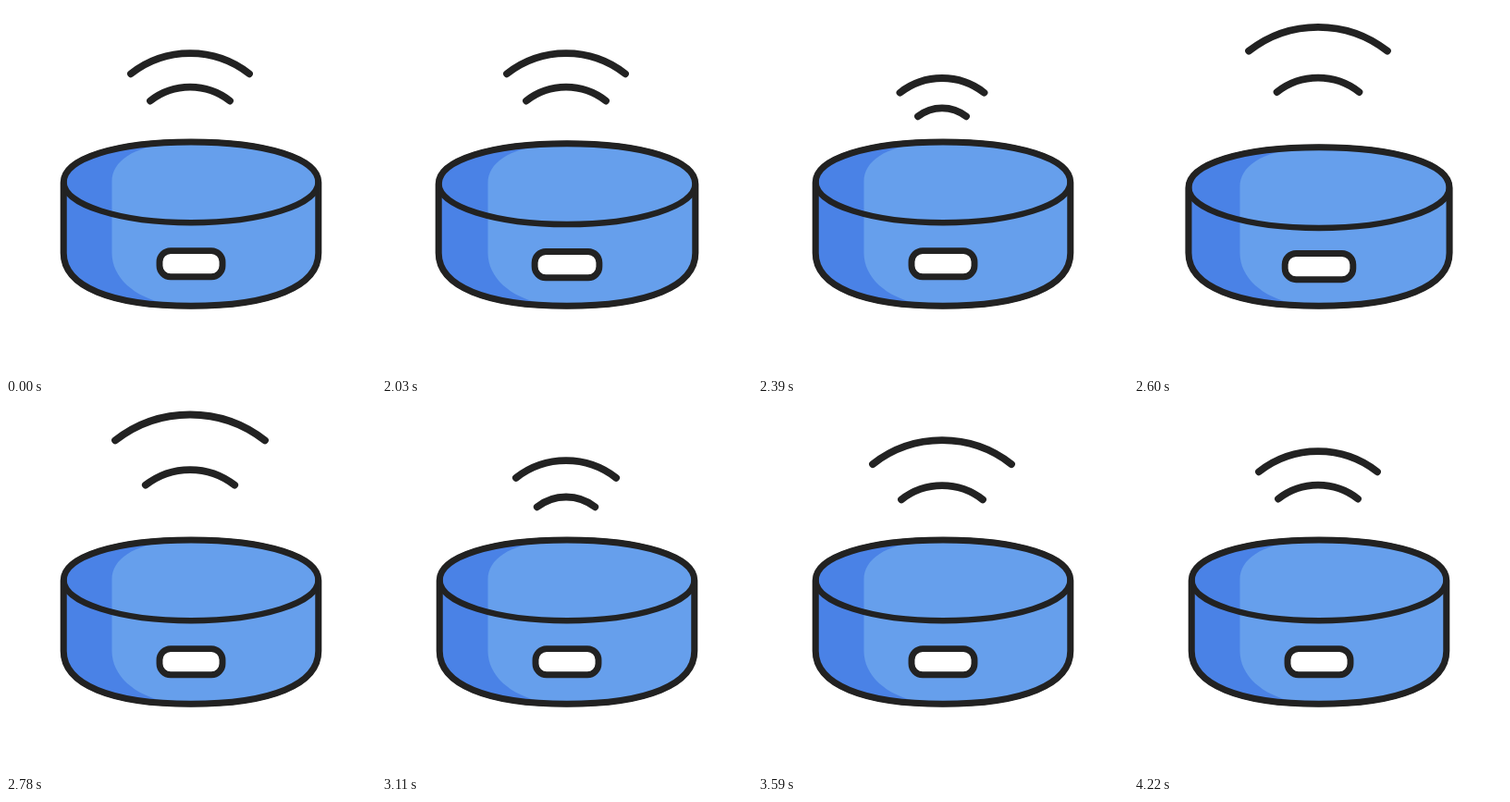
Write an HTML page with a canvas that moves like this. It is 400 by 400 pixels and loops after 4250 ms.

```html
<!DOCTYPE html>
<html lang="en">
<head>
<meta charset="utf-8">
<title>Smart speaker</title>
<style>
  html, body { margin: 0; width: 100%; height: 100%; overflow: hidden; background: #fff; }
  canvas { display: block; width: 400px; height: 400px; }
</style>
</head>
<body>
<canvas id="stage" width="400" height="400"></canvas>
<script>
const ctx = document.getElementById('stage').getContext('2d');

const LOOP = 4250, START = 2030, STEP = 30;
const INK = '#222', LIGHT = '#669fec', DARK = '#4a82e6';
const BEAT = { first: 1985, gap: 405, length: 300, count: 4 };

// Wave poses: time, outer half width, outer top, inner half width, inner top
const WAVES = [
  [2030, 64, 51.2, 43, 87.7],
  [2210, 85, 3, 50, 66],
  [2390, 45.5, 78, 26, 110.3],
  [2710, 85.5, 3, 51, 66],
  [3030, 45.5, 78, 26, 110.3],
  [3285, 84, 3, 49.5, 66.5],
  [3590, 75, 39.2, 44, 88.2],
  [4220, 64, 51.2, 43, 87.7]
];

const ease = p => (1 - Math.cos(Math.PI * p)) / 2;

function squashAt(t) {
  if (t < START) return 0;
  const beat = Math.floor((t - BEAT.first) / BEAT.gap);
  const age = t - BEAT.first - beat * BEAT.gap;
  if (beat >= BEAT.count || age > BEAT.length) return 0;
  return Math.sin(Math.PI * age / BEAT.length) ** 2;
}

function wavesAt(t) {
  const next = WAVES.findIndex(pose => pose[0] > t);
  if (next < 1) return WAVES[0].slice(1);
  const a = WAVES[next - 1], b = WAVES[next];
  const k = ease((t - a[0]) / (b[0] - a[0]));
  return a.slice(1).map((v, i) => v + (b[i + 1] - v) * k);
}

function stroke(width, path) {
  ctx.strokeStyle = INK;
  ctx.lineWidth = width;
  ctx.stroke(path);
}

function drawWave(half, top) {
  const rise = half * 0.345;
  const radius = (half * half + rise * rise) / (2 * rise);
  const spread = Math.asin(half / radius);
  const path = new Path2D();
  path.arc(199, top + radius, radius, -Math.PI / 2 - spread, -Math.PI / 2 + spread);
  stroke(7.8, path);
}

// Half oval from (200 - rx, y) to (200 + rx, y), or back if rx is negative; a larger k is squarer
function addHalfOval(path, y, rx, ry, k) {
  path.bezierCurveTo(200 - rx, y + ry * k, 200 - rx * k, y + ry, 200, y + ry);
  path.bezierCurveTo(200 + rx * k, y + ry, 200 + rx, y + ry * k, 200 + rx, y);
}

function drawBody(s) {
  const rx = 137.5 + 5 * s, ry = 43.5;
  const rim = 190.7 + 8.8 * s, base = 267;

  const outline = new Path2D();
  outline.moveTo(200 - rx, rim);
  addHalfOval(outline, rim, rx, -ry, 0.59);
  outline.lineTo(200 + rx, base);
  addHalfOval(outline, base, -rx, 57, 0.63);
  outline.closePath();

  stroke(7.6, outline);
  ctx.fillStyle = DARK;
  ctx.fill(outline);

  ctx.save();
  ctx.clip(outline);
  ctx.beginPath();
  ctx.moveTo(178, rim - 42);
  ctx.bezierCurveTo(138, rim - 39, 114.5, rim - 23, 114.5, rim - 1);
  ctx.lineTo(114.5, base);
  ctx.bezierCurveTo(114.5, base + 26, 138, base + 48, 174, base + 55);
  ctx.lineTo(200, 340);
  ctx.lineTo(360, 340);
  ctx.lineTo(360, 130);
  ctx.lineTo(178, 130);
  ctx.fillStyle = LIGHT;
  ctx.fill();
  ctx.restore();

  stroke(6.5, outline);
  const front = new Path2D();
  front.moveTo(200 - rx, rim);
  addHalfOval(front, rim, rx, ry, 0.555);
  stroke(6.5, front);

  const half = 34 + 4.3 * s;
  const port = new Path2D();
  port.roundRect(200 - half, 264.6 + 4.4 * s, 2 * half, 28.2, 12);
  ctx.fillStyle = '#fff';
  ctx.fill(port);
  stroke(6.9, port);
}

function draw(now) {
  let t = now % LOOP;
  t = t < START ? 0 : START + Math.floor((t - START) / STEP) * STEP;
  ctx.fillStyle = '#fff';
  ctx.fillRect(0, 0, 400, 400);
  ctx.lineCap = ctx.lineJoin = 'round';
  const [outerHalf, outerTop, innerHalf, innerTop] = wavesAt(t);
  drawWave(outerHalf, outerTop);
  drawWave(innerHalf, innerTop);
  drawBody(squashAt(t));
}

const origin = performance.now();
function tick() {
  draw(performance.now() - origin);
  requestAnimationFrame(tick);
}
tick();
</script>
</body>
</html>
```
